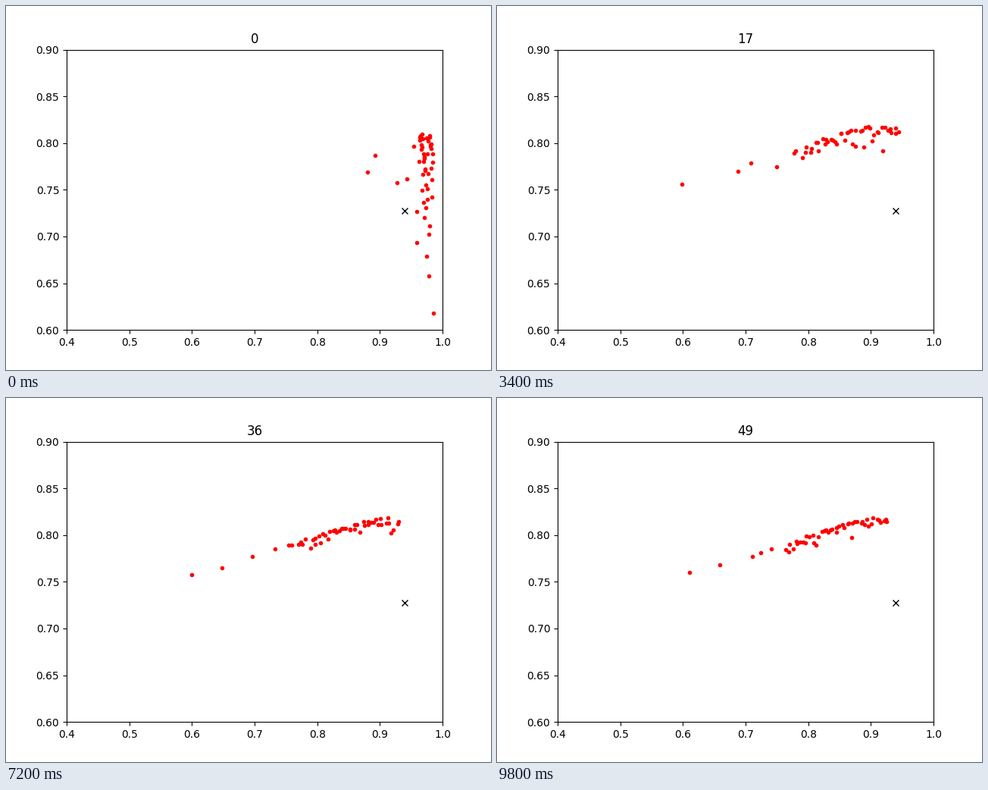
A matplotlib script for the animation above (10 s loop, 640x480 px).

```python
import numpy as np
import matplotlib.pyplot as plt
from matplotlib.animation import FuncAnimation

FRAMES, STEP, SIZE = 50, 200, 50

# How far left the last straggler reaches, at a few generations.
REACH_AT = [0, 5, 12, 23, 30, 33, 36, 41, 44, 49]
REACH_X = [.88, .714, .68, .50, .684, .452, .60, .403, .505, .611]


def front(x):
    """Best y for each x: a rounded peak at .91 with straight flanks."""
    s = .0185
    return .8195 - .21 * (np.hypot(x - .91, s) - s)


def population(n):
    """A cloud at the right edge that spreads left and settles on the front."""
    rng = np.random.default_rng(100 + n)
    right = .925 + .06 * np.exp(-n / 15)
    width = .18 - .155 * np.exp(-n / 6)
    reach = right - width - np.interp(n, REACH_AT, REACH_X)

    rank = np.linspace(0, 1, SIZE)
    u = np.clip(rank + rng.normal(0, .008, SIZE), 0, 1)
    u[-1] = 1
    tail = reach * u ** 28
    x = right - width * u - tail

    # Gap below the front: exponential, shrinking with n, wider in the tail.
    gap = -np.log(1 - rng.permutation(rank) * .985)
    scale = .004 + .041 * np.exp(-n / 6)
    y = front(x) - scale * gap * (1 + 5 * tail)
    return x, np.maximum(y, .603)


fig, ax = plt.subplots(figsize=(6.4, 4.8), dpi=100)
ax.set_xlim(.4, 1)
ax.set_ylim(.6, .9)
dots, = ax.plot([], [], "r.")
ax.plot(.94, .7275, "kx")
title = ax.set_title("0")


def update(n):
    dots.set_data(*population(n))
    title.set_text(str(n))
    return dots, title


anim = FuncAnimation(fig, update, frames=FRAMES, interval=STEP,
                     init_func=lambda: update(0), repeat=True,
                     repeat_delay=0, blit=False)
plt.show()
```
